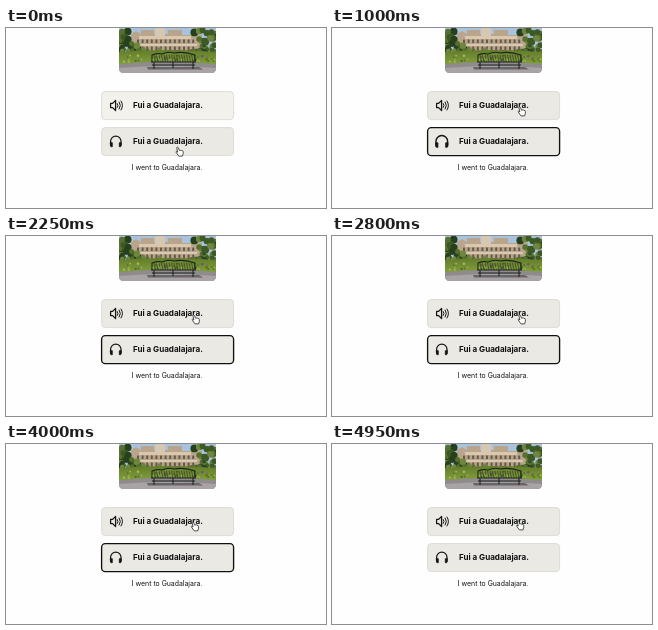
These frames come from a looping animation (320 by 180 pixels, 5000 ms). An HTML page:

```html
<!DOCTYPE html>
<html lang="en">
<head>
<meta charset="utf-8">
<title>Listening practice</title>
<style>
html, body { margin: 0; width: 100%; height: 100%; overflow: hidden; background: #fefefe; }
svg { display: block; width: 100vw; height: 100vh; }
text { font-family: Inter, sans-serif; fill: #111; }
.phrase { font-size: 8.05px; font-weight: 650; }
.icon { fill: none; stroke: #151515; stroke-width: 1.25; stroke-linecap: round; stroke-linejoin: round; }
</style>
</head>
<body>
<svg viewBox="0 0 320 180">
  <defs>
    <clipPath id="frame"><rect x="113" y="-20" width="97" height="65" rx="4.5"/></clipPath>
    <linearGradient id="lawn" x2="0" y2="1">
      <stop offset="0" stop-color="#637c2c"/><stop offset="1" stop-color="#83a33b"/>
    </linearGradient>
  </defs>

  <g clip-path="url(#frame)">
    <rect x="113" width="97" height="45" fill="#a9c3dc"/>
    <path d="M125 25V6l5-3 5 3V2h13v4h14V2h14v5h20v18z" fill="#b9a48c"/>
    <path d="M133 8h52v3h-52zM129 16h62v2h-62z" fill="#d9c8ae"/>
    <path d="M149 0h10v8h-10z" fill="#d6c7b5"/>
    <g id="windows" fill="#66594d"></g>
    <g id="trees"></g>
    <path d="M113 24q48-4 97 0v14h-97z" fill="url(#lawn)"/>
    <g id="flowers"></g>
    <path d="M113 36q48-5 97 0v9h-97z" fill="#8f8a8b"/>
    <path d="M113 40q48-4 97 0v5h-97z" fill="#aaa3a5"/>
    <path d="M141 39h52l4 2.5h-55z" fill="#68656a"/>
    <g id="bench" fill="none" stroke="#1d2420" stroke-width="1.1"></g>
  </g>

  <g stroke-width=".7">
    <rect id="normal" x="95.6" y="63.6" width="132" height="28" rx="3.6" stroke="#d3d2cb"/>
    <rect id="slow" x="95.6" y="99.6" width="132" height="28" rx="3.6"/>
  </g>
  <g class="icon">
    <path d="M104.6 75.4h2l3-2.9v10l-3-2.9h-2z"/>
    <path d="M111.4 75.6q1.3 1.9 0 3.8M113.2 74q2.4 3.5 0 7M115 73q3 4.5 0 9" stroke-width="1"/>
  </g>
  <g id="phones" class="icon">
    <path d="M-5.2 4V-.2a5.2 5.2 0 0 1 10.4 0V4"/>
    <path d="M-5.2 1.2h1.7v4h-1.1q-.6 0-.6-.8zM5.2 1.2H3.5v4h1.1q.6 0 .6-.8z" fill="#151515" stroke-width=".8"/>
  </g>
  <text class="phrase" x="127" y="80">Fui a Guadalajara.</text>
  <text class="phrase" x="127" y="116">Fui a Guadalajara.</text>
  <text x="125.8" y="141.6" font-size="6.9">I went to Guadalajara.</text>

  <g id="cursor">
    <path id="arrow" d="M0 0v7.2l1.7-1.5 1.3 2.8 1.3-.6L3 5.2h2.4z" fill="#111" stroke="#fff" stroke-width=".6"/>
    <path id="hand" d="M.4.8Q1.2-.2 2 1l1 2.7q.5-.9 1.3 0 .7-.6 1.2.3 1.1-.4 1.3.8l.1 2-.8 2.6H2.5L.1 6.1q-1-1.2.1-1.4l1.1.8z" fill="#fff" stroke="#191919" stroke-width=".75" stroke-linejoin="round"/>
  </g>
</svg>
<script>
const LOOP = 5000, NS = "http://www.w3.org/2000/svg";
const get = id => document.getElementById(id);
const set = (el, attrs) => { for (const k in attrs) el.setAttribute(k, attrs[k]); };
const add = (parent, tag, attrs) => {
  const el = document.createElementNS(NS, tag);
  set(el, attrs);
  get(parent).append(el);
};

let seed = 17;
const rand = () => (seed = seed * 16807 % 2147483647) / 2147483647;
const pick = list => list[Math.floor(rand() * list.length)];

function paintPlaza() {
  for (let i = 0; i < 13; i++) {
    const x = 131 + i * 4.6;
    add("windows", "path", { d: `M${x} 15v-3q1-1.5 2 0v3zM${x} 23v-4q1-1.5 2 0v4z` });
  }
  const greens = ["#283f1d", "#3d5925", "#55712f", "#6f8640"];
  for (let i = 0; i < 60; i++) {
    const left = i % 2, spread = rand() * 19;
    add("trees", "circle", {
      cx: left ? 113 + spread : 210 - spread * 1.15,
      cy: 2 + rand() * 23, r: 1.5 + rand() * 2.5, fill: pick(greens)
    });
  }
  for (let i = 0; i < 42; i++) {
    add("trees", "circle", { cx: 113 + rand() * 97, cy: 21 + rand() * 5, r: 1 + rand() * 1.5, fill: pick(greens) });
  }
  for (let i = 0; i < 55; i++) {
    add("flowers", "circle", {
      cx: 113 + rand() * 97, cy: 27 + rand() * 8, r: .5 + rand() * .8,
      fill: pick(["#4c6826", "#91ad45", "#a8b958", "#77526a"])
    });
  }
  add("bench", "path", { d: "M146 34V27q5-2 10-1 6-3 12-1 10-2 21 2v7M145 34h45M148 34v7M187 34v7M167 34v6M146 37h43" });
  for (let x = 148; x < 189; x += 2.5) {
    add("bench", "path", { d: `M${x} 27l1.5 7`, "stroke-width": .55 });
  }
}

const smooth = p => { p = Math.max(0, Math.min(1, p)); return p * p * (3 - 2 * p); };
const ramp = (t, from, to) => smooth((t - from) / (to - from));

function render(t) {
  const leave = ramp(t, 200, 780), drift = ramp(t, 3350, 4600);
  const x = 170.3 + 16.2 * leave - 1.6 * drift;
  const y = 118.7 - 40.2 * leave - 2 * drift;
  const overSlow = y > 99, overNormal = y < 90;
  const focus = t >= 200 && t < 4700;
  const pulse = ramp(t, 250, 450) - ramp(t, 1700, 2100);
  const fill = hover => hover ? "#eae9e3" : "#f2f1eb";

  set(get("normal"), { fill: fill(overNormal) });
  set(get("slow"), {
    fill: fill(overSlow || t > 1000),
    stroke: focus ? "#111" : "#d3d2cb",
    "stroke-width": focus ? 1.35 : .7
  });
  set(get("phones"), { transform: `translate(109.8 113.5) scale(${1 + .12 * pulse})` });
  set(get("cursor"), { transform: `translate(${x} ${y})` });
  const pointing = overSlow || overNormal;
  set(get("hand"), { visibility: pointing ? "visible" : "hidden" });
  set(get("arrow"), { visibility: pointing ? "hidden" : "visible" });
}

paintPlaza();
const start = performance.now();
function tick() {
  render((performance.now() - start) % LOOP);
  requestAnimationFrame(tick);
}
render(0);
requestAnimationFrame(tick);
</script>
</body>
</html>
```
